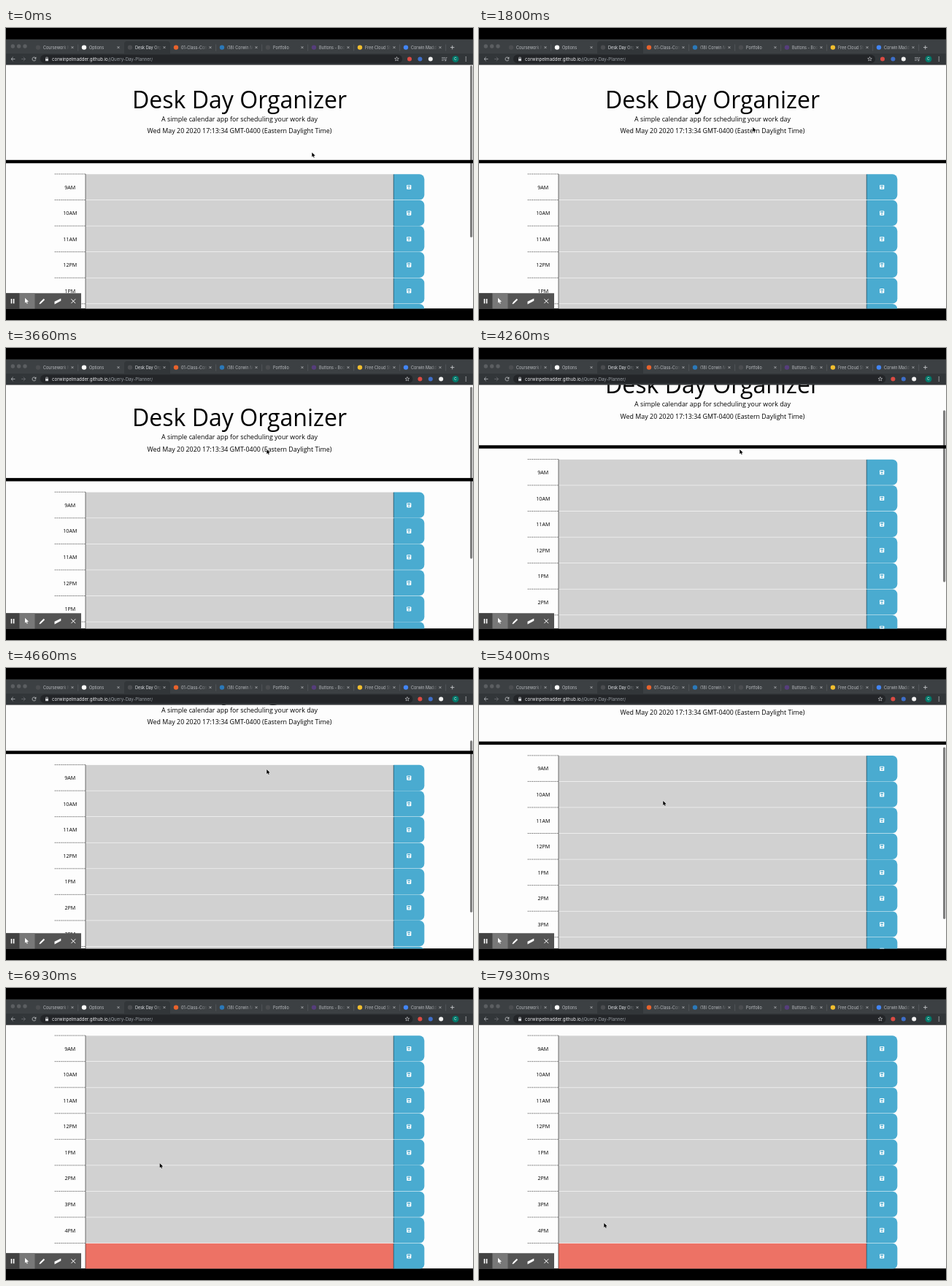
Animation of 640x400 px, one loop 8000 ms. Source, as an HTML page with a canvas:

```html
<!DOCTYPE html>
<html lang="en">
<head>
<meta charset="utf-8">
<title>Day planner</title>
<style>
html, body { margin: 0; width: 100%; height: 100%; overflow: hidden; background: #000; }
canvas { display: block; width: 640px; height: 400px; }
</style>
</head>
<body>
<canvas id="stage" width="640" height="400"></canvas>
<script>
const ctx = document.getElementById('stage').getContext('2d');
const LOOP = 8000;
const SCALE = 640 / 1440;
const PAGE_TOP = 50.2, PAGE_BOTTOM = 384.4;
const ROW = 80 * SCALE, ROWS_TOP = 200;
const LEFT = 150 * SCALE, COLUMN = 95 * SCALE;
const BODY = '"Open Sans", sans-serif', UI = 'Inter, sans-serif';
const BLUE = '#4aabd0', LIGHT = '#d0d2d5', DIM = '#4b4d50';
const ICONS_MOVE = 2800;

const TABS = [
  ['Coursework M', DIM], ['Options', '#fff'], ['Desk Day Org', DIM],
  ['01-Class-Con', '#e8622c'], ['(18) Corwin M', '#2b78b8'], ['Portfolio', DIM],
  ['Buttons - Boo', '#563d7c'], ['Free Cloud St', '#f0bd2e'], ['Corwin Madd', '#4285f4']
];

const ramp = (t, start, end) => Math.min(1, Math.max(0, (t - start) / (end - start)));
const ease = (t, start, end) => {
  const u = ramp(t, start, end);
  return u * u * (3 - 2 * u);
};

// A quick flick, a slower one, then a run to the end with a small bounce.
function scrollAt(t) {
  return 47.5 * ramp(t, 3625, 4260) + 29.8 * ramp(t, 4260, 4860)
    + 58.7 * ease(t, 5300, 6060) - 1.1 * ease(t, 6200, 6450);
}

function scrollbarAlpha(t) {
  return 1 - ramp(t, 200, 460) + ramp(t, 3600, 3650) - ramp(t, 6700, 6930);
}

function pointerAt(t) {
  const moves = [ease(t, 0, 1800), ease(t, 1800, 3260), ease(t, 4860, 5400), ease(t, 5400, 6200), ease(t, 6200, 7930)];
  const along = (start, ...steps) => steps.reduce((sum, step, i) => sum + step * moves[i], start);
  return [along(419.3, -44, -18, -105, -17, -64), along(170.4, -34.5, 3, 43, 7, 133)];
}

function rect(x, y, w, h, color) {
  ctx.fillStyle = color;
  ctx.fillRect(x, y, w, h);
}

function round(x, y, w, h, radius, color) {
  ctx.fillStyle = color;
  ctx.beginPath();
  ctx.roundRect(x, y, w, h, radius);
  ctx.fill();
}

function dot(x, y, r, color) {
  ctx.fillStyle = color;
  ctx.beginPath();
  ctx.arc(x, y, r, 0, Math.PI * 2);
  ctx.fill();
}

function text(str, x, y, size, family, color, align = 'left') {
  ctx.font = `${size}px ${family}`;
  ctx.textAlign = align;
  ctx.fillStyle = color;
  ctx.fillText(str, x, y);
  return ctx.measureText(str).width;
}

function path(points) {
  ctx.beginPath();
  points.forEach(([x, y]) => ctx.lineTo(x, y));
}

function line(color, width, ...points) {
  path(points);
  ctx.strokeStyle = color;
  ctx.lineWidth = width;
  ctx.stroke();
}

function cross(x, y, r, color, width) {
  line(color, width, [x - r, y - r], [x + r, y + r]);
  line(color, width, [x - r, y + r], [x + r, y - r]);
}

function drawTab([label, color], i) {
  const x = 37 + 63 * i, active = i === 2;
  if (active) round(x - 1, 18, 63, 18, [4, 4, 0, 0], '#323639');
  else if (i !== 1) rect(x + 61.5, 22.5, 0.6, 9, '#5f6368');
  dot(x + 7, 26.6, 3.2, color);
  const ink = active ? '223,225,229' : '185,188,192';
  const fade = ctx.createLinearGradient(x + 40, 0, x + 50, 0);
  fade.addColorStop(0, `rgb(${ink})`);
  fade.addColorStop(1, `rgba(${ink},0)`);
  text(label, x + 14, 28.7, 5.5, UI, fade);
  cross(x + 54, 26.6, 1.5, '#c3c5c8', 0.7);
}

function drawNavArrow(x, direction, color) {
  const tip = x + 2.7 * direction, back = x - 0.1 * direction;
  line(color, 0.8, [x - 2.7 * direction, 42.5], [tip, 42.5]);
  line(color, 0.8, [back, 39.8], [tip, 42.5], [back, 45.2]);
}

function drawReload(x, y) {
  ctx.strokeStyle = ctx.fillStyle = '#c3c5c8';
  ctx.lineWidth = 0.8;
  ctx.beginPath();
  ctx.arc(x, y, 2.5, 0.3, 5.5);
  ctx.stroke();
  path([[x + 2.8, y - 3], [x + 2.8, y - 0.3], [x + 0.2, y - 0.3]]);
  ctx.fill();
}

function drawStar(x, y) {
  const corner = (_, i) => {
    const r = i % 2 ? 1.3 : 3, a = i * Math.PI / 5 - Math.PI / 2;
    return [x + r * Math.cos(a), y + r * Math.sin(a)];
  };
  line(LIGHT, 0.6, ...Array.from({ length: 11 }, corner));
}

function drawPlaylistIcon(x, y) {
  for (let i = 0; i < 3; i++) rect(x - 3, y - 2.3 + 1.9 * i, i < 2 ? 5 : 3, 0.8, '#9da0a4');
  dot(x + 2.2, y + 2, 1.1, '#9da0a4');
  line('#9da0a4', 0.8, [x + 3, y + 2], [x + 3, y - 2], [x + 4.5, y - 2]);
}

function drawBrowser(t) {
  const y = 42.5, moved = t >= ICONS_MOVE, dx = moved ? 14.4 : 0;
  rect(0, 15.5, 640, 20, '#3c4043');
  for (let i = 0; i < 3; i++) dot(9.3 + 8.35 * i, 25, 2.7, '#5b5e61');
  TABS.forEach(drawTab);
  line(LIGHT, 0.8, [609, 26.6], [614.4, 26.6]);
  line(LIGHT, 0.8, [611.7, 23.9], [611.7, 29.3]);

  rect(0, 35, 640, PAGE_TOP - 35, '#323639');
  round(47, 36.6, 496 + dx, 11.6, 5.8, '#232528');
  drawNavArrow(9.7, -1, '#b9bcc0');
  drawNavArrow(23.8, 1, '#6c6f73');
  drawReload(38.5, y);

  rect(54, 42, 4, 3.2, LIGHT);
  line(LIGHT, 0.7, [54.8, 42], [54.8, 40.2], [57.2, 40.2], [57.2, 42]);
  const host = text('corwinpelmadder.github.io', 63, 44.6, 6.1, UI, '#eceef0');
  text('/jQuery-Day-Planner/', 63 + host, 44.6, 6.1, UI, '#9aa0a6');

  drawStar(535.5 + dx, y);
  ['#dc4b43', '#3e6fc9', '#f1f1f1'].forEach((color, i) => dot(553 + 14.4 * i + dx, y, 3, color));
  if (!moved) drawPlaylistIcon(600, y);
  dot(616, y, 4.5, '#00796b');
  text('C', 616, 44.4, 5.2, UI, '#e8f3f1', 'center');
  for (let i = -1; i < 2; i++) dot(630.3, y + 2.5 * i, 0.7, LIGHT);
}

function drawSaveIcon(x, y) {
  round(x - 3.1, y - 3.1, 6.2, 6.2, 0.8, '#fff');
  rect(x - 2, y - 2.2, 3.7, 1.6, BLUE);
  dot(x, y + 1.2, 1, BLUE);
}

function drawRow(i) {
  const y = ROWS_TOP + ROW * i, hour = 9 + i;
  const label = (hour > 12 ? hour - 12 : hour) + (hour < 12 ? 'AM' : 'PM');
  const field = LEFT + COLUMN, button = field + 10 * COLUMN;
  ctx.setLineDash([1.8, 0.9]);
  line('#222', 0.6, [LEFT, y], [field, y]);
  ctx.setLineDash([]);
  text(label, LEFT + COLUMN / 2, y + 20.6, 16 * SCALE, BODY, '#000', 'center');
  rect(field, y + 0.3, 10 * COLUMN, ROW - 0.6, hour === 17 ? '#ed7265' : '#d1d1d1');
  rect(field - 0.2, y, 0.6, ROW, '#222');
  round(button, y + 0.2, COLUMN, ROW - 0.4, [0, 6.7, 6.7, 0], BLUE);
  rect(button - 0.3, y + 0.5, 0.7, ROW - 1, '#173d4b');
  drawSaveIcon(button + COLUMN / 2, y + ROW / 2 + 0.2);
}

function drawPage(t) {
  const scroll = scrollAt(t);
  ctx.save();
  ctx.beginPath();
  ctx.rect(0, PAGE_TOP, 640, PAGE_BOTTOM - PAGE_TOP);
  ctx.clip();
  rect(0, PAGE_TOP, 640, PAGE_BOTTOM - PAGE_TOP, '#fdfdfd');
  ctx.translate(0, -scroll);
  text('Desk Day Organizer', 320, 110, 72 * SCALE, BODY, '#000', 'center');
  text('A simple calendar app for scheduling your work day', 320, 128, 20 * SCALE, BODY, '#000', 'center');
  text('Wed May 20 2020 17:13:34 GMT-0400 (Eastern Daylight Time)', 320, 144.3, 20 * SCALE, BODY, '#000', 'center');
  rect(0, 180.8, 640, 10 * SCALE, '#000');
  for (let i = 0; i < 9; i++) drawRow(i);
  ctx.translate(0, scroll);

  ctx.globalAlpha = scrollbarAlpha(t);
  round(636, 51.3 + scroll * 0.713, 3.2, 235.5, 1.6, 'rgba(0,0,0,0.5)');
  ctx.restore();
}

function arrowPath(x, y, k) {
  path([[0, 0], [0, 7], [1.6, 5.5], [2.7, 8], [3.8, 7.5], [2.7, 5.1], [5, 5]]
    .map(([px, py]) => [x + px * k, y + py * k]));
  ctx.closePath();
}

function drawToolbar() {
  const top = 363.3, height = PAGE_BOTTOM - top, y = 374.2;
  rect(0, top, 103, height, '#545454');
  rect(0, top, 18.5, height, '#424242');
  rect(18.5, top, 21, height, '#787878');
  for (const x of [6.7, 9.8]) rect(x, y - 3.2, 1.6, 6.4, '#fff');
  ctx.fillStyle = '#fff';
  arrowPath(26, y - 4.4, 1);
  ctx.fill();
  line('#fff', 2.1, [46.8, y + 2.9], [52.4, y - 2.7]);
  dot(46.4, y + 3.3, 0.8, '#fff');
  path([[66.5, y + 0.6], [75.3, y - 3.8], [75.3, y - 0.4], [66.5, y + 4.2]]);
  ctx.fill();
  cross(92.3, y, 2.9, '#fff', 1);
}

function drawPointer(t) {
  const [x, y] = pointerAt(t);
  ctx.lineJoin = 'round';
  arrowPath(x, y, 0.9);
  ctx.strokeStyle = '#fff';
  ctx.lineWidth = 0.9;
  ctx.stroke();
  ctx.fillStyle = '#000';
  ctx.fill();
}

function frame(now) {
  const t = now % LOOP;
  rect(0, 0, 640, 400, '#000');
  drawPage(t);
  drawBrowser(t);
  drawToolbar();
  drawPointer(t);
  requestAnimationFrame(frame);
}
requestAnimationFrame(frame);
</script>
</body>
</html>
```
